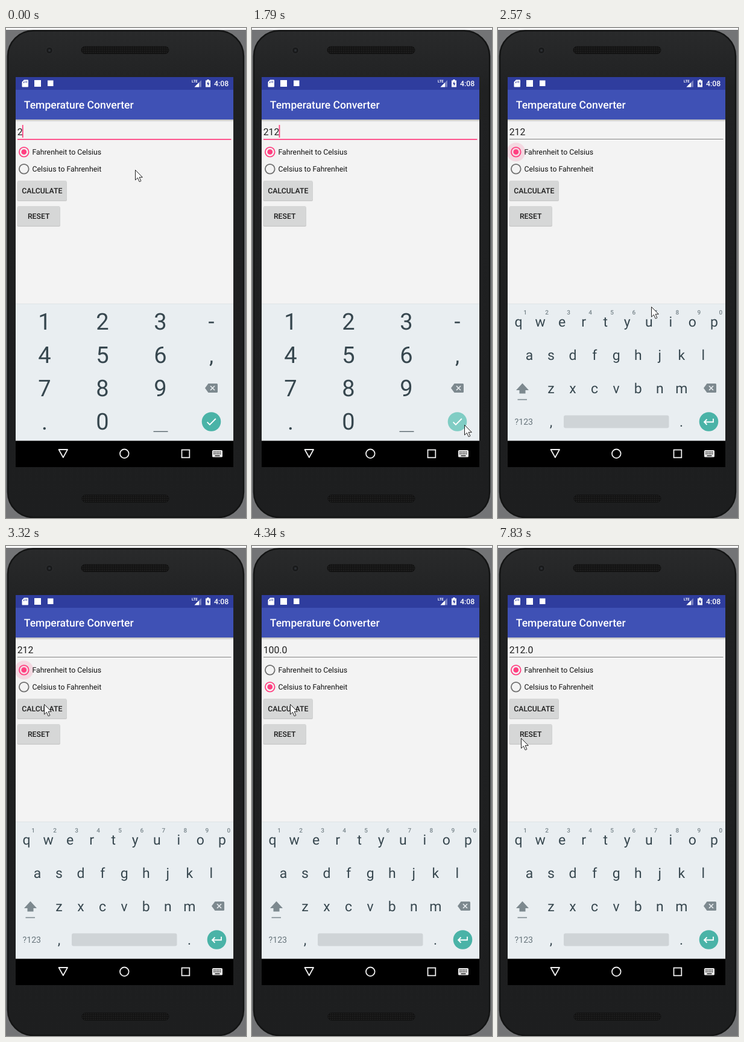
An HTML page for the animation above (8000 ms loop, 398x809 px).

```html
<!DOCTYPE html>
<html lang="en">
<head>
<meta charset="utf-8">
<title>Temperature Converter</title>
<style>
html, body { margin: 0; width: 100%; height: 100%; overflow: hidden; background: #737476; }
svg { display: block; width: 100%; height: 100%; }
text { font-family: Roboto, sans-serif; white-space: pre; text-rendering: geometricPrecision; }
.medium { font-weight: 500; }
.mid { text-anchor: middle; }
.key { fill: #37474f; text-anchor: middle; }
.line { fill: none; stroke: #eee; stroke-width: 1.8; }
.white { stroke: #fff; }
</style>
</head>
<body>
<svg viewBox="0 0 398 809" xmlns="http://www.w3.org/2000/svg">
  <defs>
    <linearGradient id="shade" x2="0" y2="1">
      <stop stop-color="#000" stop-opacity=".24"/><stop offset="1" stop-color="#000" stop-opacity="0"/>
    </linearGradient>
    <linearGradient id="shell" x2="0" y2="1">
      <stop stop-color="#292a2b"/><stop offset=".12" stop-color="#202122"/><stop offset="1" stop-color="#1d1e1f"/>
    </linearGradient>
    <pattern id="mesh" width="3" height="3" patternUnits="userSpaceOnUse">
      <rect width="3" height="3" fill="#121212"/><circle cx="1.5" cy="1.5" r=".7" fill="#303030"/>
    </pattern>
    <clipPath id="screen"><rect x="16" y="81" width="361" height="644"/></clipPath>
    <clipPath id="calcShape"><rect x="19" y="252" width="81.5" height="32.5" rx="2"/></clipPath>
    <g id="erase">
      <path d="M0 7.5 5.5 0H19.500q1.500 0 1.500 1.500V13.500q0 1.500-1.500 1.500H5.500Z" fill="#7d898f"/>
      <path d="M9 4 16 11 M16 4 9 11" stroke="#e9eef1" stroke-width="1.6"/>
    </g>
  </defs>

  <rect width="398" height="3" fill="#fff"/>
  <rect x="3" y="4.500" width="391" height="803.500" rx="42" fill="url(#shell)" stroke="#131414" stroke-width="2.500"/>
  <circle cx="72" cy="37" r="5.500" fill="#191a1b" stroke="#303132"/>
  <circle cx="72" cy="37" r="2" fill="#2d3034"/>
  <rect x="125" y="30.500" width="145" height="12" rx="6" fill="url(#mesh)" stroke="#111"/>
  <rect x="126" y="771" width="144" height="12" rx="6" fill="url(#mesh)" stroke="#111"/>

  <g clip-path="url(#screen)">
    <rect x="16" y="81" width="361" height="644" fill="#f3f3f3"/>
    <rect x="16" y="151" width="361" height="4" fill="url(#shade)"/>
    <rect x="16" y="81" width="361" height="21" fill="#2f3d9e"/>
    <rect x="16" y="102" width="361" height="49" fill="#3f51b5"/>

    <g fill="#fff">
      <path d="M30 85.500h6q1 0 1 1v10q0 1-1 1h-8.500q-1 0-1-1v-7.500Z"/>
      <path d="M29.500 88.500v2.500 M32 87.500v3 M34.500 87.500v3" stroke="#2f3d9e"/>
      <rect x="47" y="86" width="11" height="11"/>
      <rect x="69" y="86.500" width="9.500" height="9.500"/>
      <text x="308" y="90" font-size="6" font-weight="700">LTE</text>
      <path d="M324 86v11.500h-11.500Z" opacity=".35"/>
      <path d="M320 90v7.500h-7.500Z"/>
      <path d="M333.500 85h3v1.500h2.500v11h-8v-11h2.500Z"/>
      <path d="M335.500 88 332.800 92.500h2v3.500l2.700-4.700h-2Z" fill="#2f3d9e"/>
      <text class="medium" x="345" y="96" font-size="12.300">4:08</text>
      <text class="medium" x="29.800" y="133" font-size="17.560">Temperature Converter</text>
    </g>

    <text id="value" x="18.700" y="176.500" font-size="15.800" fill="#212121"></text>
    <rect id="underline" x="19" y="183" width="354.500"/>
    <rect id="caret" y="160" width="1.750" height="21" fill="#ff4081"/>

    <circle id="halo" cx="29.800" cy="204.700" r="15.500" fill="#ff4081"/>
    <g id="radios"></g>
    <g font-size="12.300" fill="#111">
      <text x="43.500" y="209.300">Fahrenheit to Celsius</text>
      <text x="43.500" y="237.300">Celsius to Fahrenheit</text>
    </g>

    <g fill="#000" opacity=".16">
      <rect x="18.500" y="253" width="82.500" height="33" rx="2.500"/>
      <rect x="18.500" y="295" width="71.500" height="33" rx="2.500"/>
    </g>
    <g fill="#d6d7d7">
      <rect x="19" y="252" width="81.500" height="32.500" rx="2"/>
      <rect x="19" y="294" width="70.500" height="32.500" rx="2"/>
    </g>
    <g id="ripple" clip-path="url(#calcShape)">
      <rect x="19" y="252" width="82" height="33" opacity=".4"/>
      <circle cx="63" cy="268" r="25.500"/>
    </g>
    <g class="medium mid" font-size="12.290" fill="#1c1c1c">
      <text x="59.800" y="273">CALCULATE</text>
      <text x="54.200" y="315">RESET</text>
    </g>

    <rect x="16" y="455.500" width="361" height="226" fill="#e9eef1"/>
    <rect x="16" y="455" width="361" height="1" fill="#dfe3e6"/>
    <g id="numberPad">
      <path d="M244.500 666.300h24" stroke="#5b686e" stroke-width="1.400"/>
      <use href="#erase" x="330" y="587"/>
      <circle id="done" cx="340.500" cy="650" r="15.800"/>
      <path d="M333.600 650.600 337.900 654.900 347.800 645" class="line white"/>
    </g>
    <g id="letterPad">
      <path d="M40.500 586.500 51 598h-5.500v5.500h-10V598H30Z" fill="#7d898f"/>
      <path d="M32.500 613.500h15.500" stroke="#7d898f" stroke-width="1.600"/>
      <use href="#erase" x="341" y="587"/>
      <text class="mid" x="42.800" y="655" font-size="14.200" fill="#68757c">?123</text>
      <rect x="109" y="639.500" width="174.500" height="21" rx="3" fill="#cfd4d7"/>
      <circle cx="349.500" cy="650" r="15.800" fill="#4ab3a7"/>
      <path d="M357 645v5.500h-14.500 M346.500 646 342 650.500 346.500 655" class="line white"/>
    </g>

    <rect x="16" y="681.500" width="361" height="44" fill="#000"/>
    <g class="line">
      <path d="M87.500 696h14.500L94.800 709Z" stroke-linejoin="round"/>
      <circle cx="196.300" cy="702.800" r="7.300"/>
      <rect x="291.500" y="696.500" width="12.800" height="12.800"/>
    </g>
    <rect x="342" y="697" width="17" height="11.500" rx="1.500" fill="#eee"/>
    <path d="M344 700h13 M344 703h13" stroke="#000" stroke-width="1.500" stroke-dasharray="1.500 1"/>
    <path d="M346.500 706.300h8" stroke="#000" stroke-width="1.300"/>
  </g>
  <path id="pointer" d="M0 0V16.500L3.900 12.900 6.700 19.300 9.400 18.100 6.600 11.900H11.800Z" fill="#fff" stroke="#222" stroke-linejoin="round"/>
</svg>

<script>
const LOOP = 8000;
const HOP = 120;          // the screen refreshes in visible hops
const BLINK = 405;
const TYPED = [-BLINK * 2, 310, 710];
const DONE = 1790, FOCUS = 1910;
const PRESSES = [3880, 7020];
const INPUT = "212";
const PINK = "#ff4081", GREY = "#6f6f6f";

const $ = id => document.getElementById(id);

function add(parent, tag, attrs, text = "") {
  const node = document.createElementNS("http://www.w3.org/2000/svg", tag);
  set(node, attrs);
  node.textContent = text;
  return parent.appendChild(node);
}
function set(node, attrs) {
  for (const name in attrs) node.setAttribute(name, attrs[name]);
}

function addRow(pad, labels, left, pitch, y, size, attrs = { class: "key" }) {
  [...labels].forEach((label, i) =>
    add(pad, "text", { ...attrs, x: left + pitch * i, y, "font-size": size }, label));
}

// Keyboards
const ROW = 55, PITCH = 36.05;
["123", "456", "789", ".0"].forEach((labels, r) =>
  addRow($("numberPad"), labels, 64, 96, 498 + ROW * r, 38));
addRow($("numberPad"), "-", 340.5, 0, 497, 36);
addRow($("numberPad"), ",", 340.5, 0, 553, 36);

["qwertyuiop", "asdfghjkl", "zxcvbnm"].forEach((labels, r) =>
  addRow($("letterPad"), labels, 34 + 18 * r * (r + 1) / 2, PITCH, 492.5 + ROW * r, 23));
addRow($("letterPad"), "1234567890", 45, PITCH, 473, 10, { class: "mid medium", fill: "#77848a" });
addRow($("letterPad"), ",.", 88, 216, 658, 23);

const radios = [204.7, 232.7].map(cy => ({
  ring: add($("radios"), "circle", { cx: 29.8, cy, fill: "none" }),
  dot: add($("radios"), "circle", { cx: 29.8, cy })
}));

// Pointer legs: start time, number of hops, destination
const LEGS = [
  [710, 2, 343, 573], [980, 2, 113, 343], [1250, 2, 77, 271], [1520, 2, 352, 655],
  [FOCUS, 1, 347, 644], [2060, 3, 53, 259], [2450, 2, 254, 460], [2690, 3, 63, 261],
  [7440, 2, 45, 299], [7710, 2, 38, 317]
];

function pointerAt(t) {
  let x = 214, y = 234;
  for (const [start, hops, toX, toY] of LEGS) {
    if (t < start) break;
    const p = Math.min(1, (Math.floor((t - start) / HOP) + 1) / hops);
    x += (toX - x) * p;
    y += (toY - y) * p;
  }
  return [x, y];
}

function drawField(t, presses) {
  const typed = TYPED.filter(time => time <= t);
  const celsius = (INPUT - 32) * 5 / 9;
  $("value").textContent = presses === 0 ? INPUT.slice(0, typed.length)
    : (presses === 1 ? celsius : celsius * 9 / 5 + 32).toFixed(1);

  const editing = t < FOCUS;
  const lit = Math.floor((t - typed.at(-1)) / BLINK) % 2 === 0;
  set($("caret"), { x: 18 + 8.87 * typed.length, opacity: editing && lit ? 1 : 0 });
  set($("underline"), editing ? { height: 1.75, fill: PINK } : { height: 1, fill: "#858585" });
  set($("numberPad"), { display: editing ? "inline" : "none" });
  set($("letterPad"), { display: editing ? "none" : "inline" });
  set($("done"), { fill: t >= DONE ? "#80cdc4" : "#4ab3a7" });
}

// Stages 0 to 3: the chosen dot shrinks into place, the other ring thins out
function drawRadio({ ring, dot }, on, stage) {
  const width = on ? (stage ? 1.8 : 5) : (stage ? 1.8 + 1.3 * (3 - stage) : 1.8);
  const size = on ? (stage ? 4.4 + .8 * (3 - stage) : 0) : (stage ? 0 : 5);
  const color = on ? PINK : GREY;
  set(ring, { r: 8.8 - width / 2, "stroke-width": width, stroke: color });
  set(dot, { r: size, fill: color });
}

function render(t) {
  const [x, y] = pointerAt(t);
  set($("pointer"), { transform: `translate(${x + .5} ${y + .5})` });

  const pressed = PRESSES.filter(time => time <= t);
  drawField(t, pressed.length);

  const stage = pressed.length ? Math.min(3, Math.floor((t - pressed.at(-1)) / HOP)) : 3;
  radios.forEach((radio, i) => drawRadio(radio, i === pressed.length % 2, stage));
  set($("ripple"), { opacity: Math.max(0, .08 - .04 * stage) });

  const focused = t >= FOCUS && !pressed.length;
  set($("halo"), { opacity: focused ? Math.min(.15, .08 + (t - FOCUS) / 6000) : 0 });
}

const start = performance.now();
function tick() {
  render((performance.now() - start) % LOOP);
  requestAnimationFrame(tick);
}
tick();
</script>
</body>
</html>
```
